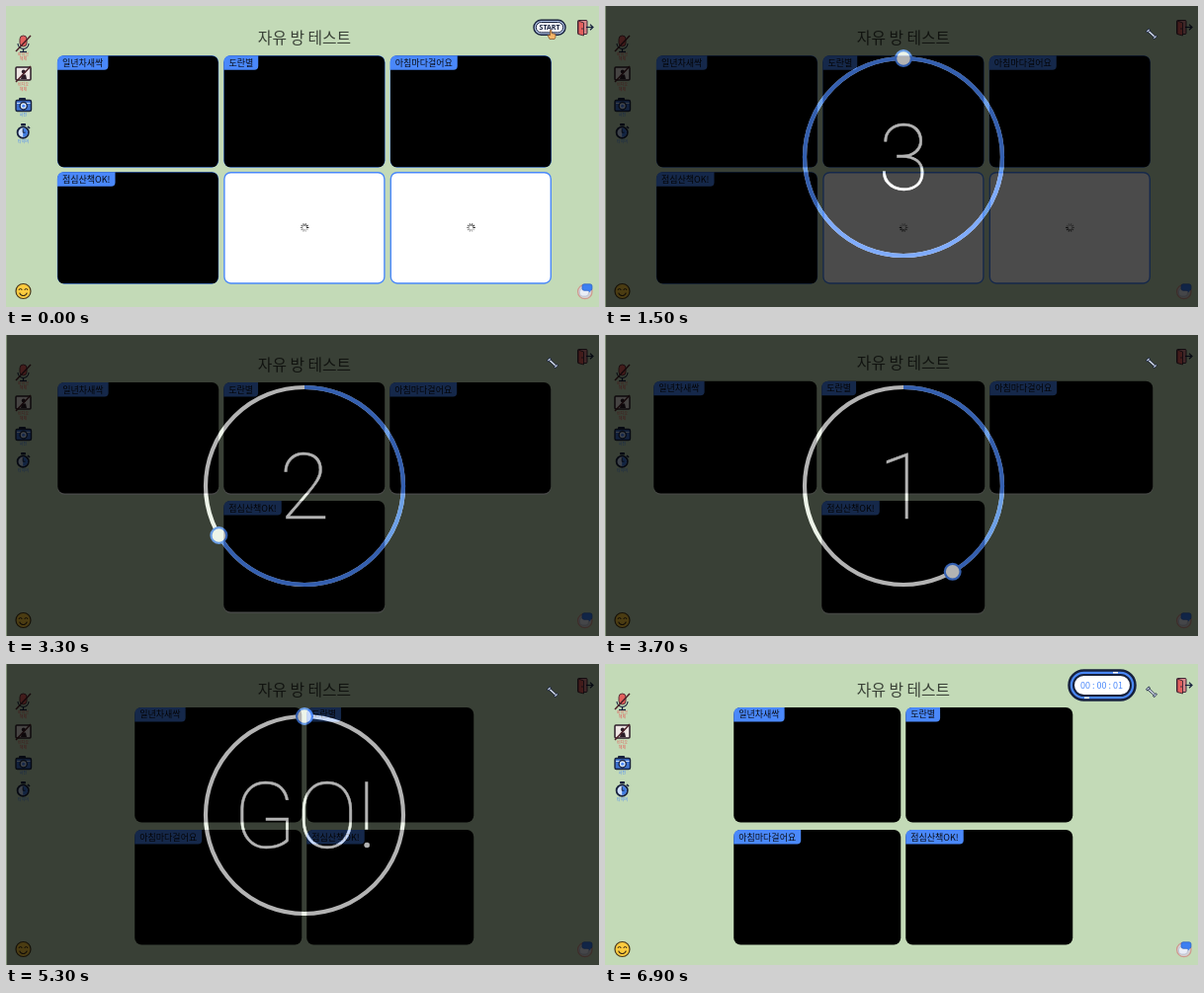
An HTML page with a canvas for the animation above (7 s loop, 600 by 305 pixels).

```html
<!DOCTYPE html>
<html lang="ko">
<head>
<meta charset="utf-8">
<title>자유 방 테스트</title>
<style>
  html, body { margin: 0; width: 100%; height: 100%; overflow: hidden; background: #c3dab7; }
  canvas { display: block; width: 600px; height: 305px; }
</style>
</head>
<body>
<canvas id="stage"></canvas>
<script>
const W = 600, H = 305, LOOP = 7000;
const HOVER = 600, COUNT = 1400, SLIDE = 2355, LEAVE = 3300, WRAP = 3900, GROWN = 4500, CLOSE = 5400, TICK = 6500;
const BLUE = '#4a88fa', NAVY = '#17213d', RED = '#e2605d', GREEN = '#c3dab7';
const KOREAN = '"Noto Sans CJK KR", "Noto Sans CJK", sans-serif';
const NAMES = ['일년차새싹', '도란별', '아침마다걸어요', '점심산책OK!'];
const TAU = Math.PI * 2;

const scale = window.devicePixelRatio || 1;
const stage = document.getElementById('stage');
const veil = document.createElement('canvas');

function prepare(canvas) {
  canvas.width = W * scale;
  canvas.height = H * scale;
  const ctx = canvas.getContext('2d');
  ctx.scale(scale, scale);
  return ctx;
}

const base = prepare(stage), over = prepare(veil);
const clamp = v => Math.max(0, Math.min(1, v));
const swing = v => 0.5 - Math.cos(Math.PI * clamp(v)) / 2;

function paint(c, fill, stroke, width) {
  if (fill) { c.fillStyle = fill; c.fill(); }
  if (stroke) { c.strokeStyle = stroke; c.lineWidth = width; c.stroke(); }
}

function box(c, x, y, w, h, r, fill, stroke, width = 1) {
  c.beginPath();
  c.roundRect(x, y, w, h, r);
  paint(c, fill, stroke, width);
}

function arc(c, x, y, r, from, to, stroke, width, fill) {
  c.beginPath();
  c.arc(x, y, r, from, to);
  paint(c, fill, stroke, width);
}

function disc(c, x, y, r, fill, stroke, width = 1) {
  arc(c, x, y, r, 0, TAU, stroke, width, fill);
}

function line(c, points, color, width = 1, fill) {
  c.beginPath();
  points.forEach(([x, y]) => c.lineTo(x, y));
  paint(c, fill, color, width);
}

function text(c, str, x, y, font, color, align = 'center') {
  c.font = font;
  c.fillStyle = color;
  c.textAlign = align;
  c.textBaseline = 'alphabetic';
  c.fillText(str, x, y);
}

function caption(c, str, y, color) {
  text(c, str, 17.5, y, '4px ' + KOREAN, color);
}

function sideIcons(c) {
  // microphone
  box(c, 14, 30, 7, 11, 3.5, RED, '#5a3038', 1);
  arc(c, 17.5, 38, 5.5, 0, Math.PI, NAVY, 1.1);
  line(c, [[17.5, 43], [17.5, 46]], NAVY, 1.3);
  line(c, [[14, 46.5], [21, 46.5]], NAVY, 1.3);
  line(c, [[25, 30], [10, 46]], '#4a1f27', 1.5);
  caption(c, '마이크', 50.5, RED);
  caption(c, '해제', 55, RED);

  // screen
  box(c, 10, 62, 15, 13, 1, '#efe6e4', '#2c1c28', 1.5);
  disc(c, 17.8, 66.5, 2, '#2c1c28');
  line(c, [[15, 74], [16, 69.5], [20, 69.5], [21, 74]], null, 0, '#2c1c28');
  line(c, [[25, 61], [10, 77]], '#4a1f27', 1.5);
  caption(c, '비디오', 81, RED);
  caption(c, '해제', 85.5, RED);

  // camera
  box(c, 13, 93, 7, 4, 1, NAVY);
  box(c, 10, 95.5, 15.5, 11, 1.5, '#3f72cf', NAVY, 1.4);
  line(c, [[11, 98.5], [24.5, 98.5]], '#c9daf5', 1);
  disc(c, 17.7, 101.3, 3.6, '#d6e6ff', NAVY, 1.3);
  disc(c, 17.7, 101.3, 1.5, BLUE);
  caption(c, '사진', 111.5, BLUE);

  // stopwatch
  box(c, 15, 119, 5, 2.5, 0.8, NAVY);
  line(c, [[22, 122], [24, 124]], NAVY, 1.6);
  disc(c, 17.2, 128.2, 5.6, '#cfe0fb', NAVY, 1.8);
  arc(c, 17.2, 128.2, 4.7, -TAU / 4, TAU / 4, null, 0, '#3f7be0');
  line(c, [[17.2, 124.5], [17.2, 128.2], [19.5, 128.2]], NAVY, 1);
  caption(c, '타이머', 138.5, BLUE);
}

function cornerIcons(c) {
  // smiley
  disc(c, 17.5, 289, 7.5, '#fdcb3f', '#4a3a1c', 1.2);
  for (const x of [14.6, 20.4]) arc(c, x, 288, 1.5, Math.PI, TAU, '#3b2d18', 1);
  arc(c, 17.5, 289.5, 4, 0.3, Math.PI - 0.3, '#3b2d18', 1.2);

  // chat
  disc(c, 585.8, 289.5, 7.2, '#d5d3d6', '#cf9a8e', 1.3);
  box(c, 580.5, 286.5, 9, 7.5, 3, '#e9edf6', '#aab4cc', 0.6);
  box(c, 583, 281.8, 10, 6.5, 2, '#3c7ff2', '#2a5fbd', 0.7);
  line(c, [[588, 287.5], [591, 290.5], [591.5, 287]], null, 0, '#3c7ff2');

  // exit door
  box(c, 578.5, 14.5, 9.5, 14, 1, '#d9868a', '#3d2634', 1);
  line(c, [[579, 15], [584.5, 17], [584.5, 30], [579, 28.5], [579, 15]], '#3d2634', 0.9, RED);
  disc(c, 583, 23, 0.7, NAVY);
  line(c, [[587, 21.5], [593.5, 21.5]], NAVY, 1.2);
  line(c, [[591, 18.8], [594, 21.5], [591, 24.2]], NAVY, 1.2);
}

function startButton(c, t) {
  const hover = t >= HOVER;
  box(c, 534, 14.2, 32, 15, 7.5, '#b9cbee', NAVY, 1.4);
  box(c, 536.3, 16.5, 27.4, 10.4, 5.2, '#f6f8fd', NAVY, 1);
  text(c, 'START', 550, 24.4, 'bold 7px "Open Sans", sans-serif', NAVY);

  const x = hover ? 554 : 552, y = 24.5;
  const skin = hover ? '#7f8db5' : '#f5b668';
  const edge = hover ? NAVY : '#7a4a25';
  line(c, [[x - 1.5, y], [x, y], [x, y + 3], [x + 4, y + 4], [x + 4, y + 7], [x + 3, y + 9],
    [x - 2, y + 9], [x - 4, y + 5], [x - 1.5, y + 5], [x - 1.5, y]], edge, 0.7, skin);
}

function timer(c, t) {
  box(c, 469.5, 6.5, 67, 30, 15, BLUE, NAVY, 2.5);
  box(c, 474, 11, 58, 21, 10.5, '#fff', NAVY, 2);
  line(c, [[514, 8.7], [519, 8.7]], '#fff', 1.5);
  line(c, [[485, 34.3], [490, 34.3]], '#fff', 1.5);
  text(c, t < TICK ? '00 : 00 : 00' : '00 : 00 : 01', 502.5, 24.5, '9px ' + KOREAN, BLUE);
}

function spinner(c, x, y, t) {
  const head = Math.floor(t / 100) % 10;
  for (let i = 0; i < 10; i++) {
    const a = i / 10 * TAU, age = (head - i + 10) % 10;
    c.globalAlpha = 0.95 - age * 0.075;
    line(c, [[x + 1.9 * Math.cos(a), y + 1.9 * Math.sin(a)],
      [x + 4.3 * Math.cos(a), y + 4.3 * Math.sin(a)]], '#222', 1.2);
  }
  c.globalAlpha = 1;
}

function label(c, name, x, y) {
  c.font = '9px ' + KOREAN;
  const width = c.measureText(name).width + 10;
  box(c, x, y, width, 14.5, [6, 0, 4, 0], BLUE);
  text(c, name, x + 5, y + 10.5, '9px ' + KOREAN, '#0a0d16', 'left');
}

function waitingRoom(c, t) {
  for (let i = 0; i < 6; i++) {
    const x = 52.5 + (i % 3) * 168.4, y = i < 3 ? 50.7 : 168.7;
    const w = 162, h = 112.3;
    box(c, x, y, w, h, 6.5, '#fff', BLUE, 1.4);
    if (i < 4) {
      // the video covers the inner part of the border
      box(c, x - 0.3, y - 0.3, w + 0.6, h + 0.6, 6.5, '#000');
      label(c, NAMES[i], x - 0.5, y - 0.5);
    } else {
      spinner(c, x + 81.2, y + 55.8, t);
    }
  }
  return 50;
}

function fullRoom(c, t) {
  const grow = clamp((t - LEAVE) / (GROWN - LEAVE));
  const w = 163 + 6 * grow, h = w * 0.69, gap = 5;
  const columns = t < WRAP ? 3 : 2;
  const top = 160.5 - h;
  NAMES.forEach((name, i) => {
    const row = Math.floor(i / columns);
    const count = Math.min(columns, NAMES.length - row * columns);
    const left = 301.75 - (count * w + (count - 1) * gap) / 2;
    const x = left + (i % columns) * (w + gap), y = row ? 168 : top;
    c.globalAlpha = 1 - grow;
    box(c, x, y + 1.5, w, h, 7, '#f2f4f2');
    c.globalAlpha = 1;
    box(c, x, y, w, h, 7, '#000');
    label(c, name, x, y);
  });
  return top;
}

function countdown(c, t) {
  const x = 302, y = 153, r = 100, step = Math.floor((t - SLIDE) / 1000);
  const word = step < 0 ? '3' : ['2', '1', 'GO!'][Math.min(step, 2)];
  const moved = [0, 1, 2].reduce((sum, i) => sum + swing((t - SLIDE - i * 1000) / 520), 0);
  const angle = TAU * (1 - moved / 3) - TAU / 4;

  c.clearRect(0, 0, W, H);
  c.fillStyle = '#000';
  c.fillRect(0.5, 0, W, H);
  disc(c, x, y, r, null, '#fff', 4.2);
  arc(c, x, y, r, -TAU / 4, angle, BLUE, 4.2);
  disc(c, x + r * Math.cos(angle), y + r * Math.sin(angle), 7.9, '#fff', BLUE, 2.2);

  text(c, word, x, 186, '100 93px Roboto, sans-serif', '#fff');
  c.strokeStyle = '#fff';
  c.lineWidth = 0.5;
  c.strokeText(word, x, 186);
}

function dumbbell(c) {
  const bar = [[549.5, 25], [556.5, 31.6]];
  line(c, bar, NAVY, 2.6);
  line(c, bar, '#dfe6f2', 1.4);
  for (const [x, y] of bar) {
    line(c, [[x - 1.6, y + 1.6], [x + 1.6, y - 1.6]], NAVY, 2.4);
    line(c, [[x - 1.1, y + 1.1], [x + 1.1, y - 1.1]], '#cfdaf0', 1.2);
  }
}

function draw(t) {
  base.fillStyle = GREEN;
  base.fillRect(0, 0, W, H);
  sideIcons(base);
  cornerIcons(base);
  const top = t < LEAVE ? waitingRoom(base, t) : fullRoom(base, t);
  text(base, '자유 방 테스트', 302, top - 12.2, '300 15.8px ' + KOREAN, '#3a4237');

  if (t < COUNT) {
    startButton(base, t);
    return;
  }
  if (t < CLOSE) {
    countdown(over, t);
    base.globalAlpha = 0.7;
    base.drawImage(veil, 0, 0, W, H);
    base.globalAlpha = 1;
  } else {
    timer(base, t);
  }
  dumbbell(base);
}

const began = performance.now();
function loop() {
  draw((performance.now() - began) % LOOP);
  requestAnimationFrame(loop);
}
loop();
</script>
</body>
</html>
```
